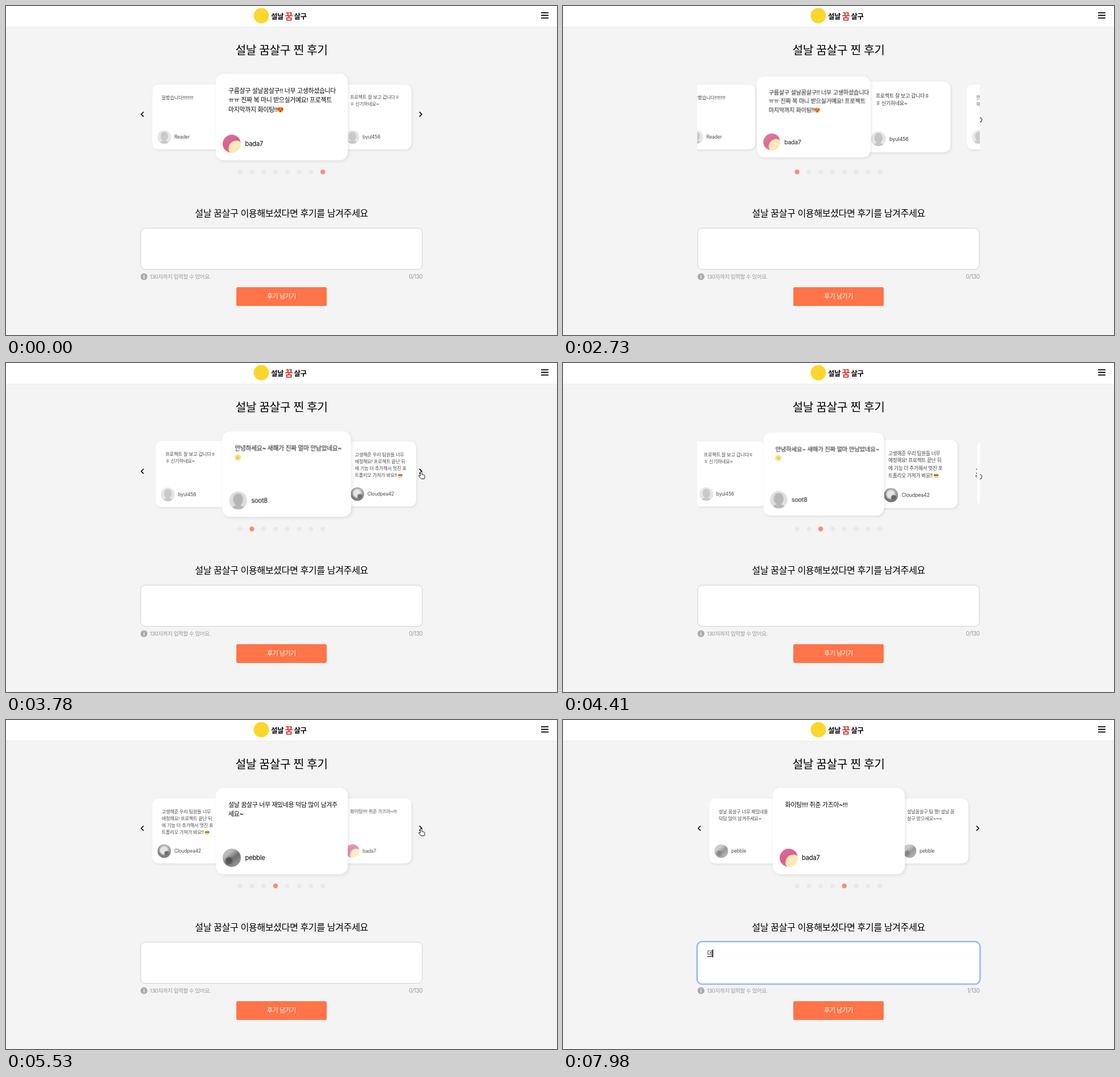
An HTML page that plays this animation: 969 px wide and 578 px high, repeating every 8000 ms.

```html
<!DOCTYPE html>
<html>
<head>
<meta charset="utf-8">
<style>
  html, body { margin: 0; width: 100%; height: 100%; overflow: hidden; background: #f4f4f4; }
  body { position: relative; font-family: Inter, 'Noto Sans CJK KR', 'Noto Sans CJK', sans-serif; letter-spacing: -.03em; }
  svg { position: absolute; left: 0; top: 0; width: 969px; height: 578px; }
  #track { position: absolute; left: 236px; top: 105px; width: 497px; height: 178px; overflow: hidden; }
  .card { position: absolute; left: 248.5px; top: 14px; height: 152px; border-radius: 14px; background: #fff;
    box-shadow: 2px 2px 6px rgba(0, 0, 0, .09); color: #000; white-space: pre; }
  .card p { position: absolute; left: 22px; top: 21.5px; margin: 0; font-size: 10.95px; line-height: 16.6px; letter-spacing: -.03em; }
  .card b { position: absolute; left: 51.5px; top: 113px; font: 400 11.2px/20px Inter, sans-serif; letter-spacing: -.02em; }
  .avatar { position: absolute; left: 12px; top: 107px; width: 32px; height: 32px; border-radius: 50%; }
  .plain { background: radial-gradient(ellipse 9px 11px at 50% 45%, #b5b5b5 96%, transparent),
    radial-gradient(ellipse 12px 8px at 50% 100%, #b5b5b5 96%, transparent), #dedede; }
  .pink { background: radial-gradient(circle at 75% 75%, #f8e9b5 38%, transparent 42%),
    linear-gradient(150deg, #d86a9d 25%, #e05b86 50%, #d99cc0); }
  .pale { background: radial-gradient(ellipse at 68% 66%, #3a3133 14%, transparent 22%),
    radial-gradient(circle at 48% 45%, #dfdcda 32%, transparent 50%), linear-gradient(200deg, #a5a19d, #4a4a4c 75%); }
  .gray { background: radial-gradient(circle at 35% 65%, #555 14%, transparent 26%),
    linear-gradient(140deg, #b9b9b9 30%, #6f6f6f 55%, #a9a9a9); }
  .emoji { display: inline-block; width: 10.5px; height: 10.5px; border-radius: 50%; vertical-align: -1.5px; }
  .love { background: radial-gradient(circle at 25% 38%, #e33b3b 20%, transparent 24%),
    radial-gradient(circle at 75% 38%, #e33b3b 20%, transparent 24%),
    radial-gradient(circle at 50% 74%, #7a3b16 14%, transparent 18%), #fbb13c; }
  .cool { background: linear-gradient(transparent 25%, #332c2c 25% 52%, transparent 52%), #f8bd3c; }
  .chick { background: radial-gradient(circle at 50% 55%, #ee9a2f 14%, transparent 18%), #fbdc6b; }
</style>
</head>
<body>
<svg>
  <rect y="36" width="969" height="1.5" fill="#e9e9e9"/>
  <rect width="969" height="36.5" fill="#fff"/>
  <circle cx="449" cy="17" r="13.5" fill="#fcd62d"/>
  <g font-weight="800" text-anchor="middle" font-size="12.5">
    <text x="477" y="22.5">설날</text><text x="517.5" y="22.5">살구</text>
    <text x="497.5" y="23.5" font-size="15.5" fill="#d8332a">꿈</text>
  </g>
  <path d="M941 11.8h13M941 16.5h13M941 21.2h13" stroke="#000" stroke-width="1.8"/>
  <g text-anchor="middle">
    <text x="484.5" y="85" font-size="20.4">설날 꿈살구 찐 후기</text>
    <text x="484.5" y="369.5" font-size="16.2">설날 꿈살구 이용해보셨다면 후기를 남겨주세요</text>
  </g>
  <g id="dots"></g>
  <rect id="field" fill="#fff"/>
  <text id="typed" x="253.5" y="414" font-size="11.5" fill="#222" text-decoration="underline"></text>
  <rect id="caret" y="403" width="1.2" height="14" fill="#222"/>
  <circle cx="242.7" cy="475.5" r="6" fill="#aaa"/>
  <path d="M242.7 472v1.5M242.7 474.7v4" stroke="#fff" stroke-width="1.5"/>
  <g font-size="9.6" fill="#999">
    <text x="253" y="479.3">130자까지 입력할 수 있어요.</text>
    <text id="count" x="732.5" y="479.3" text-anchor="end" font-size="10"></text>
  </g>
  <rect x="405" y="494" width="159" height="33" rx="2.5" fill="#ff7448"/>
  <text x="484.5" y="514.3" font-size="11" fill="#fff" text-anchor="middle">후기 남기기</text>
</svg>
<div id="track"></div>
<svg>
  <path d="M242 186l-4.2 4.2 4.2 4.2M727 186l4.2 4.2-4.2 4.2" fill="none" stroke="#000" stroke-width="1.6"/>
  <g id="cursor">
    <circle id="press" r="21.3" fill="none" stroke="#000" stroke-opacity=".55" stroke-width="1.6"/>
    <path id="pointer"/>
  </g>
</svg>
<script>
const LOOP = 8000, SLIDE = 300, PITCH = 165.6;
// In review texts "|" breaks lines in the large card, "/" in the small one.
const reviews = [
  ['byul456', 'plain', '프로젝트 잘 보고 갑니다ㅎ/ㅎ 신기하네요~'],
  ['soot8', 'plain', '안녕하세요~ 새해가 진짜 얼/마 안남았네요~| 🐥'],
  ['Cloudpea42', 'pale', '고생해준 우리 팀원들 너무/ 애정해요! 프로|젝트 끝난 뒤/에 기능 더 추가해서 멋진 포/트|폴리오 가져가 봐요!! 😎'],
  ['pebble', 'gray', '설날 꿈살구 너무 재밌네용/ 덕담 많이 남겨주|세요~'],
  ['bada7', 'pink', '화이팅!!!! 취준 가즈아~!!!'],
  ['pebble', 'gray', '설날꿈살구 팀 짱! 설날 꿈/살구 받으세요~~~'],
  ['Reader', 'plain', '잘봤습니다!!!!!!!!!'],
  ['bada7', 'pink', '구름살구 설날꿈살구!! 너무/ 고생하셨습니다| ㅠㅠ 진짜/ 복 마니 받으실거예요! 프로/젝트| 마지막까지 화이팅!!😍'],
];
// Wide texts break a little earlier than the card edge, as words are kept whole around "포트".
reviews[2][2] = reviews[2][2].replace('포/트|', '포/트|');
const emoji = { '😍': 'love', '😎': 'cool', '🐥': 'chick' };
const clicks = [520, 2560, 3450, 4255, 5095, 5825, 6800];
const slides = clicks.slice(1, 6).map(t => t + 115);
const path = [[70, 490, 548], [350, 455, 425], [1580, 455, 425], [1890, 683, 168], [2100, 722, 178],
  [2380, 730, 191], [6020, 730, 191], [6230, 626, 350], [6580, 500, 427]];
const pointers = {
  arrow: ['M0 0V9.8L2.2 7.8 3.8 11.4 5.6 10.6 4 7.2H6.9Z', '#000', '#fff'],
  hand: ['M-1.3 .8a1.3 1.3 0 0 1 2.6 0V5l4 .8q1.6 .5 1.4 2.4L5.6 12.5H0L-4 8q-.5-1.6 1-1.5l1.7 1.2Z', '#fff', '#000'],
  beam: ['M-2.5-7Q0-7 0-5.5Q0-7 2.5-7M0-5.5V5.5M-2.5 7Q0 7 0 5.5Q0 7 2.5 7', 'none', '#333'],
};

const $ = id => document.getElementById(id);
const set = (el, attrs) => { for (const k in attrs) el.setAttribute(k, attrs[k]); };
const show = (el, on) => { el.style.display = on ? '' : 'none'; };
const mix = (a, b, k) => a + (b - a) * k;
const within = (t, a, b) => t >= a && t < b;

// cubic-bezier(.25, .1, .25, 1)
function ease(x) {
  let lo = 0, hi = 1, u;
  for (let n = 0; n < 14; n++) {
    u = (lo + hi) / 2;
    if (.75 * u * (1 - u) + u ** 3 < x) lo = u; else hi = u;
  }
  return .3 * u * (1 - u) ** 2 + 3 * u * u * (1 - u) + u ** 3;
}

const layout = (text, mark) => text
  .replace(/([|/])( ?)/g, (_, m, space) => m === mark ? '\n' : space)
  .replace(/😍|😎|🐥/gu, e => `<i class="emoji ${emoji[e]}"></i>`);

const cards = reviews.map(([name, look, text]) => {
  const el = document.createElement('div');
  el.className = 'card';
  el.innerHTML = `<div><p>${layout(text, '|')}</p><p>${layout(text, '/')}</p><div class="avatar ${look}"></div><b>${name}</b></div>`;
  $('track').append(el);
  return el;
});
const dots = reviews.map((_, i) => {
  const dot = document.createElementNS('http://www.w3.org/2000/svg', 'circle');
  set(dot, { cx: 411.6 + 20.8 * i, cy: 291.5, r: 4.2 });
  $('dots').append(dot);
  return dot;
});

function drawCards(t) {
  const started = slides.filter(s => t >= s).length;
  const current = (7 + started) % 8;
  const pos = 7 + slides.reduce((sum, s) => sum + ease(Math.min(1, Math.max(0, (t - s) / SLIDE))), 0);
  cards.forEach((el, i) => {
    const d = ((i - pos + 20) % 8) - 4;
    const k = Math.min(1, Math.abs(d));
    const width = mix(232, PITCH, k);
    el.style.width = width + 'px';
    el.style.transform = `translateX(${d * PITCH - width / 2}px) scale(${mix(1, .75, k)})`;
    el.style.zIndex = Math.round(100 - Math.abs(d) * 20);
    show(el, Math.abs(d) < 2.5);
    const body = el.firstChild;
    body.style.opacity = mix(1, .7, k);
    show(body.children[0], k < .3);
    show(body.children[1], k >= .3);
    dots[i].setAttribute('fill', i === current ? '#f98e6d' : '#eaeaea');
  });
}

function drawField(t) {
  const start = t < 4000 ? clicks[0] : clicks[6];
  const focus = within(t, clicks[0], clicks[1]) || t >= clicks[6];
  const typed = t >= 7980 ? '데' : t >= 7700 ? 'ㄷ' : '';
  set($('field'), focus
    ? { x: 235.7, y: 389.2, width: 497.8, height: 74.8, rx: 9, stroke: '#9fb8ea', 'stroke-width': 2.6 }
    : { x: 236.8, y: 390.3, width: 495.4, height: 72.4, rx: 8, stroke: '#cfcfcf', 'stroke-width': 1 });
  $('typed').textContent = typed;
  $('count').textContent = typed.length + '/130';
  $('caret').setAttribute('x', typed ? 263 : 253.3);
  show($('caret'), focus && (typed || (t - start) % 1060 < 530));
}

function drawCursor(t) {
  let n = path.findIndex(p => p[0] > t);
  if (n < 0) n = path.length;
  const a = path[Math.max(0, n - 1)], b = path[n] || a;
  const k = b === a ? 0 : (t - a[0]) / (b[0] - a[0]);
  const x = mix(a[1], b[1], k), y = mix(a[2], b[2], k);
  const overButton = within(x, 405, 564) && within(y, 494, 527);
  const overNext = x > 720 && within(y, 182, 200);
  const overField = within(x, 236, 733) && within(y, 390, 463);
  const [d, fill, stroke] = pointers[overField ? 'beam' : overButton || overNext ? 'hand' : 'arrow'];
  set($('pointer'), { d, fill, stroke, 'stroke-width': .9 });
  set($('cursor'), { transform: `translate(${x} ${y})` });
  show($('cursor'), within(t, 70, 7490));
  show($('press'), clicks.some(c => within(t, c, c + 140)));
}

function frame(now) {
  const t = now % LOOP;
  drawCards(t);
  drawField(t);
  drawCursor(t);
  requestAnimationFrame(frame);
}
frame(performance.now());
</script>
</body>
</html>
```
